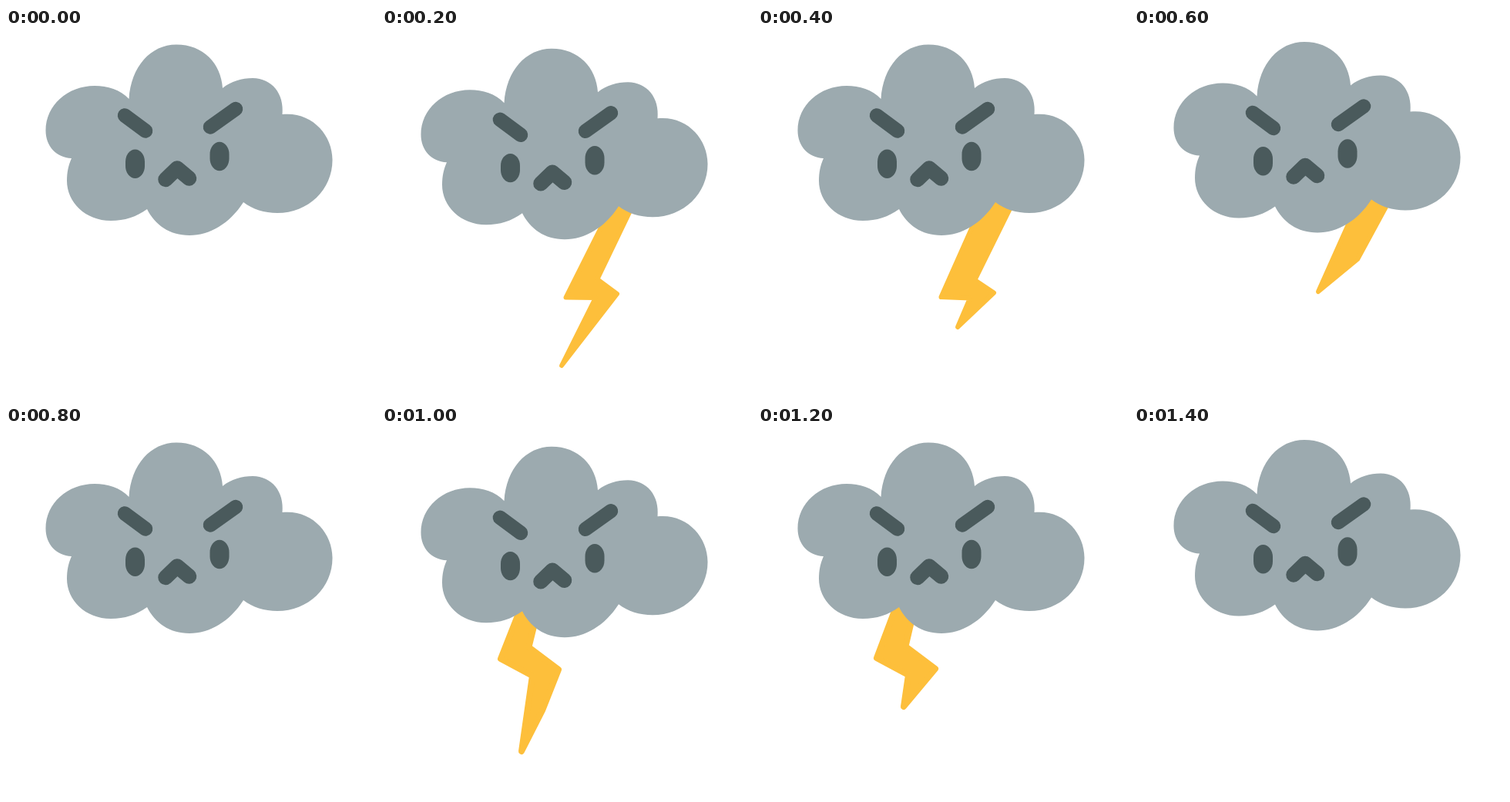
An HTML page with a canvas that plays this animation: 480x480 px, repeating every 1.6 s.

```html
<!DOCTYPE html>
<html lang="en">
<head>
<meta charset="utf-8">
<title>Angry storm cloud</title>
<style>
  html, body { margin: 0; width: 100%; height: 100%; overflow: hidden; background: #fff; }
  canvas { display: block; width: 100vw; height: 100vh; }
</style>
</head>
<body>
<canvas id="stage" width="480" height="480"></canvas>
<script>
const ctx = document.getElementById('stage').getContext('2d');
const STEP = 200;
const GREY = '#9caaaf', DARK = '#4a5a5c', YELLOW = '#fdbf3b';

const cloud = new Path2D(`M159.5 92
  C162 50 188 21.5 221 21.5 C256 21.5 279 46 281 78
  C292 69 306 65 320 65 C345 65.5 361 85 358.5 112
  C396 108 423.5 138 423.5 171 C423.5 210 392 240 352 240
  C335 240 320 235 308 226 C290 254 264 269 238 269
  C212 269 193 255 183 235 C169 245 154 250 136 250
  C103 250 79 226 79 198 C79 187 81 178 85 169
  C65 168 51.5 153 51.5 133 C51.5 100 80 75 115 75
  C132 75 148 80 159.5 92Z`);

// Bolt outlines, rounded by a stroke of the given radius
const bolt = (radius, d) => ({ radius, path: new Path2D(d + 'Z') });
const rightLong = bolt(3, 'M337 206L279.3 326 305 345 233 438 277 350 238.5 349.5 307 213');
const rightShort = bolt(3, 'M341 206L281.3 327 306 343.5 259 388 275 350.5 237.5 349 298 213');
const rightStub = bolt(3, 'M341 206L290 300 239 342 298 210');
const leftLong = bolt(4, 'M203 236L190.4 287 229 316 208 369 181 422 195 324 154 302 180 236');
const leftShort = bolt(4, 'M204 232L191.4 286 230 315 189 364 195 323 154 301 180 232');

const rest = { x: 0, y: 0 }, low = { x: -1, y: 5.3 }, high = { x: 0, y: -3.5 };
const poses = [
  { at: rest },
  { at: low, bolt: rightLong },
  { at: rest, bolt: rightShort },
  { at: high, bolt: rightStub },
  { at: rest },
  { at: low, bolt: leftLong },
  { at: rest, bolt: leftShort },
  { at: high }
];

function line(width, ...pts) {
  ctx.lineWidth = width;
  ctx.beginPath();
  pts.forEach(p => ctx.lineTo(...p));
  ctx.stroke();
}

function eye(x, y) {
  ctx.beginPath();
  ctx.roundRect(x - 12.5, y - 18.7, 25, 37.4, { x: 12.5, y: 16 });
  ctx.fill();
}

function drawBolt({ radius, path }) {
  ctx.fillStyle = ctx.strokeStyle = YELLOW;
  ctx.lineWidth = radius * 2;
  ctx.fill(path);
  ctx.stroke(path);
}

function drawCloud({ x, y }) {
  ctx.save();
  ctx.translate(x, y);
  ctx.fillStyle = GREY;
  ctx.fill(cloud);
  ctx.fillStyle = ctx.strokeStyle = DARK;
  line(18.5, [154, 113.5], [181, 133.5]);
  line(18.5, [298, 105], [265, 128.5]);
  eye(167.5, 176.3);
  eye(277, 166.5);
  line(19.5, [207, 196.5], [222, 182], [237.5, 195]);
  ctx.restore();
}

function frame() {
  const pose = poses[Math.floor(performance.now() / STEP) % poses.length];
  ctx.fillStyle = '#fff';
  ctx.fillRect(0, 0, 480, 480);
  if (pose.bolt) drawBolt(pose.bolt);
  drawCloud(pose.at);
  requestAnimationFrame(frame);
}

ctx.lineCap = ctx.lineJoin = 'round';
frame();
</script>
</body>
</html>
```
